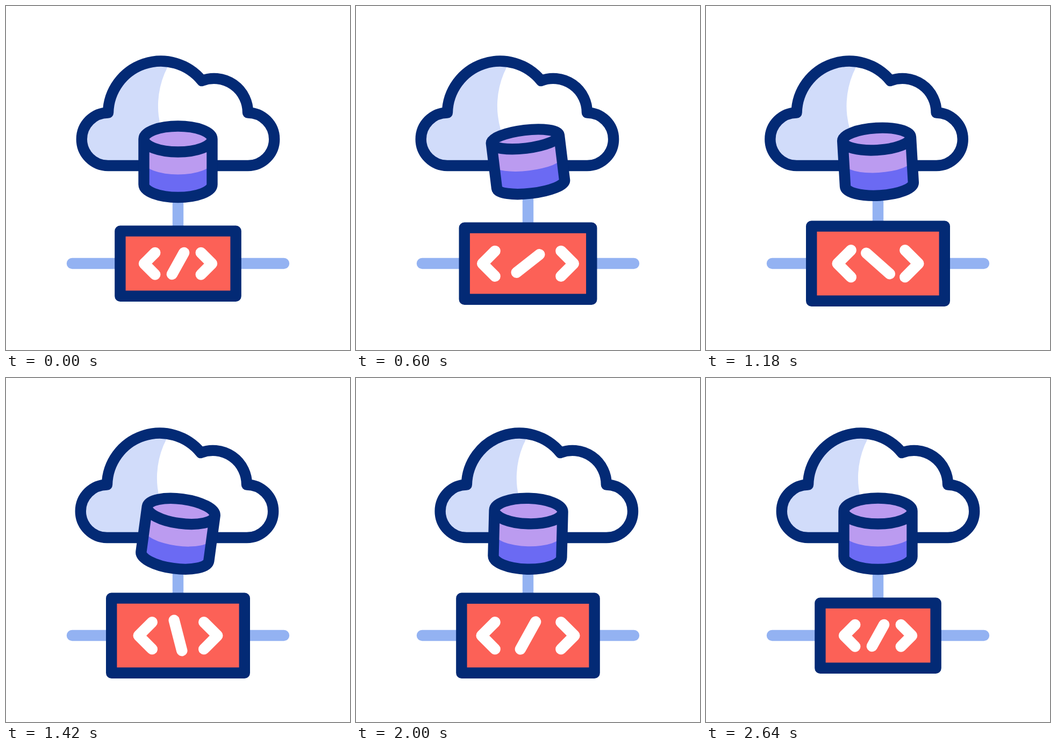
Write an HTML page that moves like this. It is 640 px wide and 640 px high and loops after 3000 ms.

```html
<!DOCTYPE html>
<html lang="en">
<head>
<meta charset="utf-8">
<style>
  html, body { margin: 0; height: 100%; overflow: hidden; background: #fff; }
  svg { display: block; width: 100%; height: 100%; }
  .line { fill: none; stroke-width: 20.4; stroke-linecap: round; stroke-linejoin: round; }
  .navy { stroke: #032a75; }
  .blue { stroke: #93b2f2; }
  .white { stroke: #fff; }
</style>
</head>
<body>
<svg viewBox="0 0 640 640">
  <g id="cloud">
    <path fill="#d1dcfa" d="M190 297A49.2 49.2 0 0 1 190 198.6A98.4 98.4 0 0 1 307 102.4A157 157 0 0 0 329 297Z"/>
    <path class="line navy" d="M190 297A49.2 49.2 0 0 1 190 198.6A98.2 98.2 0 0 1 364.5 139A63 63 0 0 1 450 198.6A49.2 49.2 0 0 1 450 297Z"/>
  </g>
  <path class="line blue" d="M123 479H517M320 330V479"/>
  <g id="cylinder">
    <path id="body" fill="#bb9bf0"/>
    <path id="lower" fill="#6b6af3"/>
    <path id="outline" class="line navy"/>
  </g>
  <rect id="box" class="line navy" style="fill:#fc6157"/>
  <path id="code" class="line white"/>
</svg>
<script>
  const el = id => document.getElementById(id);
  const mix = (a, b, k) => a + (b - a) * k;

  // Eased value at time t for a list of [time, value] keys.
  function track(t, keys) {
    if (t <= keys[0][0]) return keys[0][1];
    for (let i = 1; i < keys.length; i++) {
      const [t0, v0] = keys[i - 1], [t1, v1] = keys[i];
      if (t < t1) {
        const s = (t - t0) / (t1 - t0);
        return mix(v0, v1, s * s * (3 - 2 * s));
      }
    }
    return keys[keys.length - 1][1];
  }

  function drawCylinder(swing) {
    const ry = swing < 0 ? 24 + 11.7 * swing : 24 - 1.8 * swing;
    const left = 256.5, right = 383.5, top = 247.5, middle = 289.5, bottom = 332;
    const arc = (x, y, sweep) => `A63.5 ${ry} 0 0 ${sweep} ${x} ${y}`;
    const body = `M${left} ${top}${arc(right, top, 1)}V${bottom}${arc(left, bottom, 1)}Z`;
    el("body").setAttribute("d", body);
    el("lower").setAttribute("d",
      `M${left} ${middle}${arc(right, middle, 0)}V${bottom}${arc(left, bottom, 1)}Z`);
    el("outline").setAttribute("d", `${body}M${left} ${top}${arc(right, top, 0)}`);
    el("cylinder").setAttribute("transform", `rotate(${11.4 * swing} 320 290)`);
  }

  function drawBox(grow) {
    const w = mix(107.6, 123.8, grow), h = mix(60.6, 69.6, grow);
    const rect = { x: 320 - w, y: 479.2 - h, width: 2 * w, height: 2 * h };
    for (const name in rect) el("box").setAttribute(name, rect[name]);
  }

  function drawCode(grow, spread, turn) {
    const arm = mix(20.3, 25.1, grow), half = mix(22.9, 29.2, grow);
    const angle = (turn - 61) * Math.PI / 180;
    const dx = half * Math.cos(angle), dy = half * Math.sin(angle);
    const chevron = side => {
      const tip = 320 + side * spread, end = tip - side * arm;
      return `M${end} ${479.3 - arm}L${tip} 479.3L${end} ${479.3 + arm}`;
    };
    el("code").setAttribute("d",
      `${chevron(-1)}${chevron(1)}M${320 - dx} ${479 - dy}L${320 + dx} ${479 + dy}`);
  }

  function frame() {
    const t = performance.now() % 3000;
    const grow = track(t, [[200, 0], [860, 1], [1960, 1], [2640, 0]]);
    const shift = track(t, [[200, 0], [900, -33], [1815, 18.3], [2620, 0]]);
    el("cloud").setAttribute("transform", `translate(${shift})`);
    drawCylinder(track(t, [[200, 0], [900, -1], [1600, 1], [2250, -.3], [2640, 0]]));
    drawBox(grow);
    drawCode(grow,
      track(t, [[200, 63], [880, 97.5], [1270, 72], [2100, 87], [2640, 63]]),
      track(t, [[200, 0], [1995, 180]]));
    requestAnimationFrame(frame);
  }
  frame();
</script>
</body>
</html>
```
